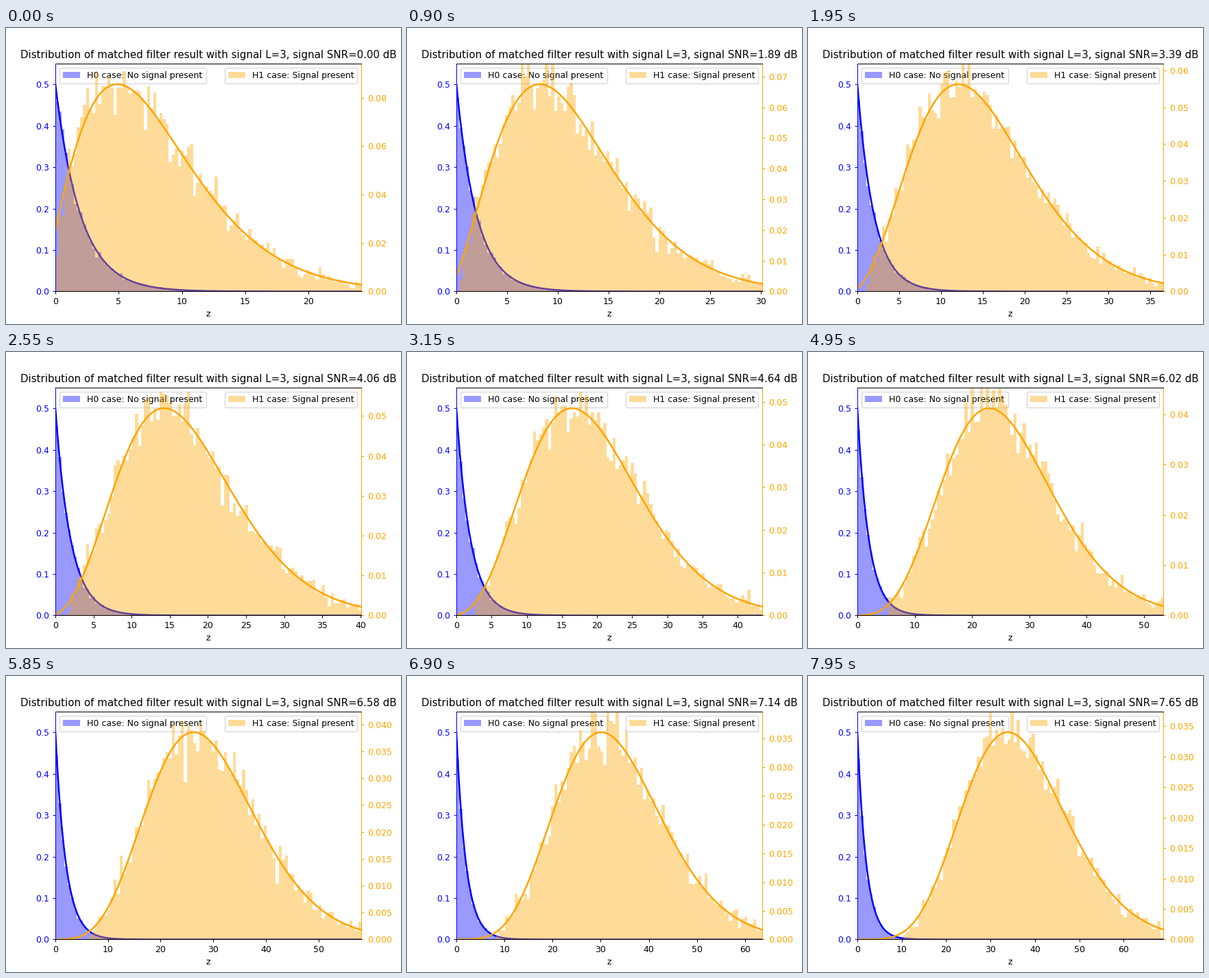
Animation of 576x432 px, one loop 8000 ms. Source, as a matplotlib script:

```python
import numpy as np
import matplotlib.pyplot as plt
from matplotlib.animation import FuncAnimation

L = 3
SAMPLES = 10000
BINS = 100
INTERVAL = 50
FRAMES = 160
TICKS_PER_STEP = 3

SNRS = np.linspace(1, 10, 100)
GRID = np.linspace(0, 100, 10001)


def pdf_h0(z):
    return 0.5 * np.exp(-z / 2)


def pdf_h1(z, nc):
    """Noncentral chi-squared density with two degrees of freedom."""
    return 0.5 * np.exp(-(z + nc) / 2) * np.i0(np.sqrt(nc * z))


def quantile_h1(q, nc):
    p = pdf_h1(GRID, nc)
    cdf = np.concatenate([[0], np.cumsum((p[1:] + p[:-1]) / 2)]) * GRID[1]
    return np.interp(q, cdf, GRID)


fig, ax0 = plt.subplots(figsize=(6.4, 4.8), dpi=90)
ax1 = ax0.twinx()


def make_case(ax, color, label, loc):
    hist = ax.stairs(np.zeros(BINS), np.linspace(0, 1, BINS + 1), fill=True,
                     color=color, alpha=0.4, label=label)
    line, = ax.plot([], [], color=color, lw=2)
    ax.tick_params(axis="y", colors=color)
    ax.legend(loc=loc)
    return hist, line


hist0, line0 = make_case(ax0, "blue", "H0 case: No signal present", "upper left")
hist1, line1 = make_case(ax1, "orange", "H1 case: Signal present", "upper right")
for ax in (ax0, ax1):
    ax.spines["left"].set_color("blue")
    ax.spines["right"].set_color("orange")
ax0.set_xlabel("z")
title = ax0.set_title("")


def update_case(ax, hist, line, z, density, samples):
    edges = np.linspace(0, z[-1], BINS + 1)
    heights, _ = np.histogram(samples, bins=edges, density=True)
    hist.set_data(heights, edges)
    line.set_data(z, density)
    ax.set_ylim(0, 1.1 * density.max())


def update(frame):
    step = frame // TICKS_PER_STEP
    snr = SNRS[step]
    nc = 2 * L * snr
    rng = np.random.default_rng(step)
    low, high = quantile_h1(0.003, nc), quantile_h1(0.99, nc)
    z = np.linspace(0, high, 500)

    noise = rng.exponential(2, SAMPLES)
    signal = rng.noncentral_chisquare(2, nc, SAMPLES)
    update_case(ax0, hist0, line0, z, pdf_h0(z), noise)
    update_case(ax1, hist1, line1, z, pdf_h1(z, nc), signal[signal > low])

    ax0.set_xlim(0, high)
    title.set_text(f"Distribution of matched filter result with signal L={L}, "
                   f"signal SNR={10 * np.log10(snr):.2f} dB")
    return hist0, line0, hist1, line1, title


anim = FuncAnimation(fig, update, frames=FRAMES, interval=INTERVAL,
                     repeat=True, repeat_delay=0)
plt.show()
```
